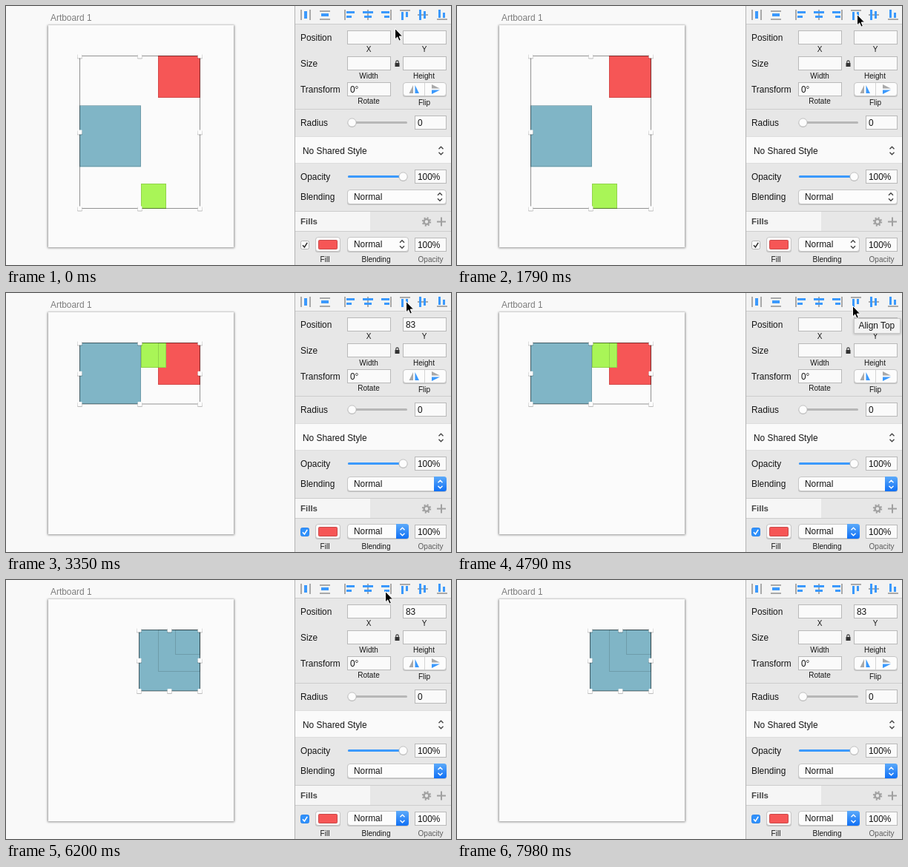
An HTML page for the animation above (8.43 s loop, 600 by 350 pixels).

```html
<!DOCTYPE html>
<html lang="en">
<head>
<meta charset="utf-8">
<title>Aligning layers</title>
<style>
html, body { margin: 0; width: 100%; height: 100%; overflow: hidden; background: #f9f9f9; }
svg { display: block; width: 600px; height: 350px; }
text { font: 11.9px "Liberation Sans", Arial, sans-serif; fill: #161616; }
text.small { font-size: 10px; text-anchor: middle; }
.bar { fill: #3b99fc; }
.axis { fill: #a9a9a9; }
.pressed .bar { fill: #23619f; }
.pressed .axis { fill: #5c5c5c; }
</style>
</head>
<body>
<svg id="stage" viewBox="0 0 600 350">
  <defs>
    <filter id="soft" x="-10%" y="-10%" width="120%" height="120%"><feGaussianBlur stdDeviation="1.4"/></filter>
    <linearGradient id="cap" x2="0" y2="1"><stop stop-color="#5caafa"/><stop offset="1" stop-color="#1070f5"/></linearGradient>
  </defs>
  <g id="canvas"></g>
  <g id="panel"></g>
  <g id="tip"></g>
  <path id="cursor" d="M.5 .5V15L3.7 11.9L6 17.2L8.4 16.2L6.2 11H10.6Z" fill="#000" stroke="#fff" stroke-width="1" stroke-linejoin="round"/>
</svg>
<script>
const LOOP = 8430;
const $ = id => document.getElementById(id);
const BLUE = '#3b99fc';

function add(parent, tag, attrs, content) {
  const node = document.createElementNS('http://www.w3.org/2000/svg', tag);
  for (const key in attrs) node.setAttribute(key, attrs[key]);
  if (content !== undefined) node.textContent = content;
  parent.appendChild(node);
  return node;
}
const set = (node, attrs) => { for (const key in attrs) node.setAttribute(key, attrs[key]); };
const show = (node, on) => node.setAttribute('visibility', on ? 'visible' : 'hidden');
const box = (parent, x, y, width, height, fill, more) =>
  add(parent, 'rect', { x, y, width, height, fill, ...more });
const path = (parent, d, attrs) => add(parent, 'path', { d, fill: 'none', ...attrs });

const panel = $('panel');
const text = (x, y, content, more) => add(panel, 'text', { x, y, ...more }, content);
const small = (x, y, content, fill = '#161616') =>
  add(panel, 'text', { x, y, class: 'small', style: `fill:${fill}` }, content);

// Canvas
const canvas = $('canvas');
box(canvas, 0, 0, 390, 350, '#f9f9f9');
box(canvas, 56, 26, 252, 301, '#000', { opacity: .42, filter: 'url(#soft)' });
box(canvas, 57, 26, 250, 300, '#fbfbfb');
add(canvas, 'text', { x: 60, y: 19.5, style: 'fill:#7d7d7d' }, 'Artboard 1');

const layers = [
  { size: 57, fill: '#f65656', at: [[205, 67], [205, 67], [205, 67]] },
  { size: 34, fill: '#a9f557', at: [[182, 240], [182, 67], [228, 67]] },
  { size: 83, fill: '#80b5c6', at: [[99, 134.5], [99, 67], [179, 67]] }
];
for (const layer of layers) layer.body = box(canvas, 0, 0, layer.size, layer.size, layer.fill);
for (const layer of layers)
  layer.edge = box(canvas, 0, 0, layer.size - 1, layer.size - 1, 'none', { stroke: '#000', 'stroke-opacity': .14 });

const bounds = [[99, 67, 163, 207], [99, 67, 163, 83.5], [179, 67, 83, 83.5]];
const frame = box(canvas, 0, 0, 0, 0, 'none', { stroke: '#000', 'stroke-opacity': .42 });
const handles = [];
for (const u of [0, .5, 1]) for (const v of [0, .5, 1]) {
  if (u === .5 && v === .5) continue;
  const node = add(canvas, 'g', {});
  box(node, -3.5, -2.5, 7, 6.5, '#000', { rx: 1.5, opacity: .25 });
  box(node, -3, -3, 6, 6, '#fcfcfc', { rx: 1 });
  handles.push({ u, v, node });
}

function arrange(stage) {
  for (const { at, body, edge } of layers) {
    const [x, y] = at[stage];
    set(body, { x, y });
    set(edge, { x: x + .5, y: Math.floor(y) + .5 });
  }
  const [x, y, w, h] = bounds[stage];
  set(frame, { x: x + .5, y: y + .5, width: w - 1, height: h - 1 });
  for (const { u, v, node } of handles)
    set(node, { transform: `translate(${x + .5 + u * (w - 1)} ${y + .5 + v * (h - 1)})` });
}

// Inspector
box(panel, 390, 0, 210, 350, '#e7e7e7');
box(panel, 390, 0, 210, 24, '#f3f3f3');
box(panel, 390, 177, 210, 35, '#fafafa');
box(panel, 390, 277, 101, 27, '#f6f6f6');
box(panel, 389, 0, 1, 350, '#b4b4b4');
for (const y of [24, 139, 277, 304]) box(panel, 390, y, 210, 1, '#cdcdcd');
for (const y of [176, 212]) box(panel, 390, y, 210, 1, '#dedede');

// Each icon: grey axes first, then blue bars, as [x, y, width, height].
const icons = [
  [[[397, 5, 2, 14], [409, 5, 2, 14]], [[402, 7, 4, 10]]],
  [[[423, 6, 14, 2], [423, 17, 14, 2]], [[425, 10, 10, 4]]],
  [[[456, 5, 2, 14]], [[459, 7, 11, 3], [459, 13, 7, 3]]],
  [[[487, 5, 2, 14]], [[481, 7, 14, 3], [483, 13, 10, 3]]],
  [[[518, 5, 2, 14]], [[506, 7, 11, 3], [510, 13, 7, 3]]],
  [[[531, 5, 14, 2]], [[533, 8, 3, 11], [539, 8, 3, 7]]],
  [[[555, 11, 14, 2]], [[557, 5, 3, 14], [563, 7, 3, 10]]],
  [[[581, 17, 14, 2]], [[583, 5, 3, 11], [589, 9, 3, 7]]]
].map(([axes, bars]) => {
  const icon = add(panel, 'g', {});
  for (const r of axes) set(box(icon, ...r), { class: 'axis' });
  for (const r of bars) set(box(icon, ...r), { class: 'bar' });
  return icon;
});

const field = (x, y, w, value) => {
  box(panel, x + .5, y + .5, w - 1, 18, '#fafafa', { stroke: '#b9b9b9' });
  return text(x + 4, y + 14, value);
};
const rows = { Position: 47, Size: 82, Transform: 117, Radius: 162, Opacity: 235, Blending: 262 };
for (const name in rows) text(397, rows[name], name);

field(460, 33, 59, '');
const yValue = field(535, 33, 59, '83');
field(460, 68, 59, '');
field(535, 68, 59, '');
field(460, 103, 59, '0°');
field(551, 148, 43, '0');
field(551, 221, 43, '100%');
field(551, 313, 43, '100%');
small(489, 62, 'X');
small(564, 62, 'Y');
small(489, 97.5, 'Width');
small(563.5, 97.5, 'Height');
small(489, 131.5, 'Rotate');
small(564, 133.5, 'Flip');

// Lock
box(panel, 524.5, 77, 6, 5, '#333');
path(panel, 'M525.8 77V75.6A1.7 1.7 0 0 1 529.2 75.6V77', { stroke: '#333', 'stroke-width': 1.1 });

// Flip buttons
const button = (x, y, w, h) => {
  box(panel, x, y + 1, w, h, '#000', { rx: 3.5, opacity: .16 });
  box(panel, x + .5, y + .5, w - 1, h - 1, '#fcfcfc', { rx: 3.5, stroke: '#c6c6c6' });
};
button(535, 103, 59, 19);
box(panel, 564, 104, 1, 17, '#d4d4d4');
path(panel, 'M549 107V118H543.5Z', { fill: '#a9a9a9' });
path(panel, 'M551.5 107V118H557Z', { fill: BLUE });
path(panel, 'M574 111.5V106L585 111.5Z', { fill: '#a9a9a9' });
path(panel, 'M574 113.5V119L585 113.5Z', { fill: BLUE });

// Sliders
const slider = (y, color, knob) => {
  box(panel, 461, y - 1.5, 80, 3, '#b7b7b7', { rx: 1.5 });
  if (color) box(panel, 461, y - 1.5, knob - 461, 3, color, { rx: 1.5 });
  add(panel, 'circle', { cx: knob, cy: y + .6, r: 6, fill: '#000', opacity: .18 });
  add(panel, 'circle', { cx: knob, cy: y, r: 5.6, fill: '#fcfcfc', stroke: '#bcbcbc', 'stroke-width': .8 });
};
slider(157.5, null, 466.5);
slider(230.5, BLUE, 535.5);

// Pop-up menus
const chevrons = (parent, x, y, stroke) =>
  path(parent, `M${x - 3} ${y - 2.3}l3 -3l3 3M${x - 3} ${y + 2.3}l3 3l3 -3`, { stroke, 'stroke-width': 1.4 });
const whenActive = [], whenInactive = [];
const popup = (x, y, w) => {
  button(x, y, w, 20);
  text(x + 9, y + 14, 'Normal');
  const right = x + w;
  whenInactive.push(chevrons(panel, right - 9, y + 10, '#444'));
  const cap = add(panel, 'g', {});
  path(cap, `M${right - 17} ${y}h13.5q3.5 0 3.5 3.5v13q0 3.5 -3.5 3.5h-13.5z`, { fill: 'url(#cap)' });
  chevrons(cap, right - 8.5, y + 10.5, '#fff');
  whenActive.push(cap);
};
text(400, 199.5, 'No Shared Style');
chevrons(panel, 586.5, 195.5, '#444');
popup(460, 248, 134);
popup(460, 312, 83);

// Fills
text(397, 295, 'Fills', { style: 'font-weight:bold;font-size:11.5px;fill:#444' });
add(panel, 'circle', { cx: 567, cy: 291.5, r: 3.4, fill: 'none', stroke: '#a0a0a0', 'stroke-width': 2.4 });
add(panel, 'circle', { cx: 567, cy: 291.5, r: 5.2, fill: 'none', stroke: '#a0a0a0', 'stroke-width': 2, 'stroke-dasharray': '2.04 2.04' });
path(panel, 'M581 291.5H593M587 285.5V297.5', { stroke: '#a0a0a0', 'stroke-width': 2 });

const checkbox = (fill, border, tick) => {
  const g = add(panel, 'g', {});
  box(g, 397.5, 317.5, 11, 11, fill, { rx: 2, stroke: border });
  path(g, 'M400 323.2L402.4 326L406.2 319.8', { stroke: tick, 'stroke-width': 1.6 });
  return g;
};
whenInactive.push(checkbox('#fcfcfc', '#b5b5b5', '#333'));
whenActive.push(checkbox('#3091fb', '#2b86ee', '#fff'));

button(417, 312, 34, 20);
box(panel, 421.5, 316.5, 25, 12, '#f65656', { rx: 1, stroke: '#c94848' });
small(430, 346, 'Fill');
small(499, 346, 'Blending');
small(572.5, 346, 'Opacity', '#5c5c5c');

// Tooltips
const tooltip = (x, w, label) => {
  const g = add($('tip'), 'g', {});
  box(g, x - .5, 35, w + 1, 21, '#000', { opacity: .2, rx: 1, filter: 'url(#soft)' });
  box(g, x + .5, 34.5, w - 1, 20, '#f3f3f3', { stroke: '#c8c8c8' });
  add(g, 'text', { x: x + 6.5, y: 48 }, label);
  return g;
};
const topTip = tooltip(535, 63, 'Align Top');
const rightTip = tooltip(513, 72, 'Align Right');

const mix = (a, b, p) => a + (b - a) * p;
const glide = p => p * p * (3 - 2 * p);
const moves = [
  { start: 1200, end: 1790, steps: 6, points: [[524, 30], [539, 11]] },
  { start: 4550, end: 4785, steps: 3, points: [[539, 11], [533, 17]] },
  { start: 4900, end: 5370, steps: 5, points: [[533, 17], [511, 15]] },
  { start: 7160, end: 7860, steps: 7, points: [[511, 15], [580, 331]] }
];

function pointer(t) {
  let spot = moves[0].points[0];
  for (const { start, end, steps, points: [from, to] } of moves) {
    if (t < start) break;
    const done = Math.min(steps, 1 + Math.floor((t - start) / (end - start) * (steps - 1)));
    const p = glide(done / steps);
    spot = [mix(from[0], to[0], p), mix(from[1], to[1], p)];
  }
  return spot;
}

function draw(t) {
  const during = (a, b) => t >= a && t < b;
  const active = t >= 3230;
  arrange(t < 3350 ? 0 : t < 6200 ? 1 : 2);
  whenActive.forEach(node => show(node, active));
  whenInactive.forEach(node => show(node, !active));
  show(yValue, t >= 3350);
  icons[5].classList.toggle('pressed', during(3230, 3350));
  icons[4].classList.toggle('pressed', during(6080, 6200));
  show(topTip, during(4785, 5135));
  show(rightTip, during(5250, 6080));
  const [x, y] = pointer(t);
  set($('cursor'), { transform: `translate(${x} ${y})` });
  show($('cursor'), t < 7980);
}

const origin = performance.now();
function tick() {
  draw((performance.now() - origin) % LOOP);
  requestAnimationFrame(tick);
}
tick();
</script>
</body>
</html>
```
